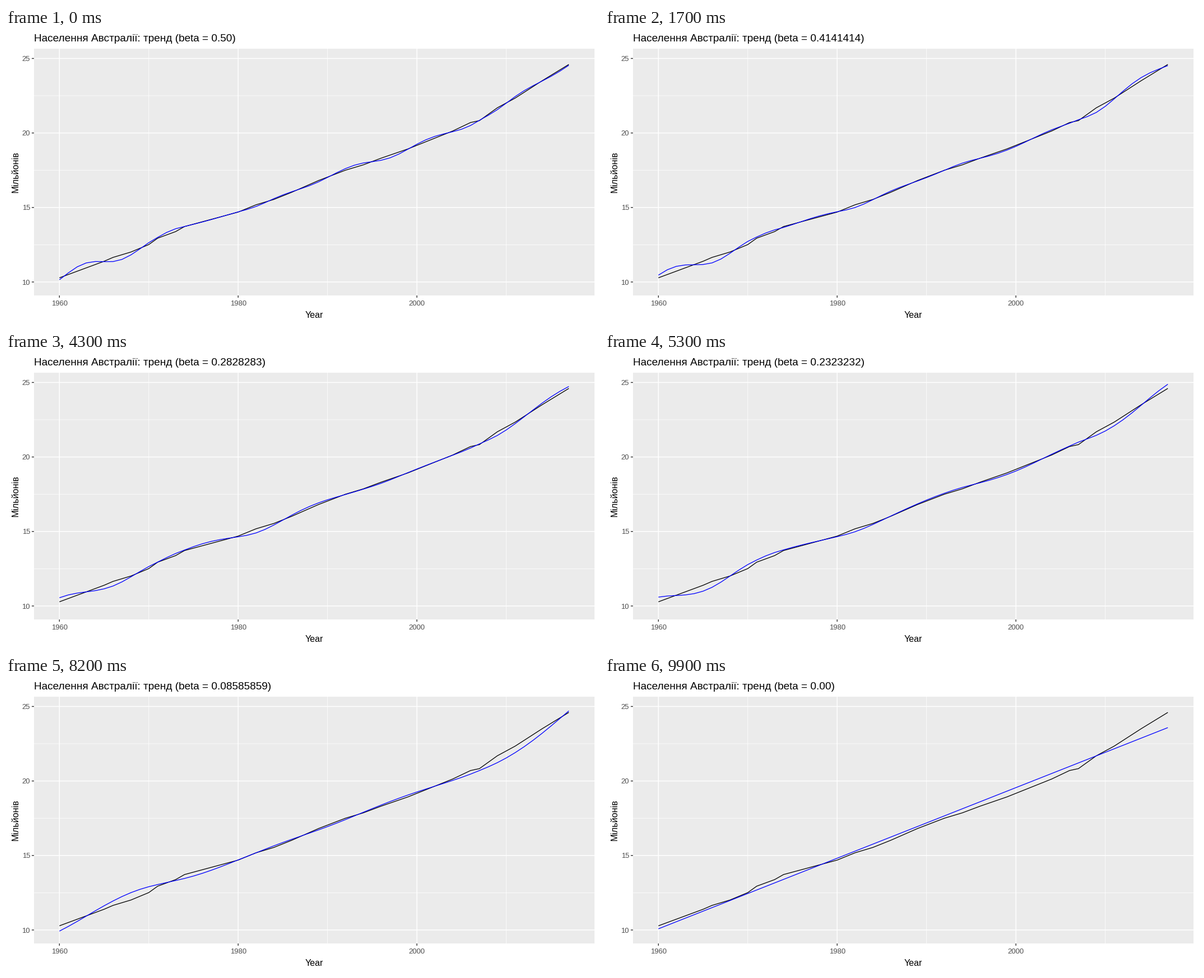
A matplotlib script for the animation above (10 s loop, 1058 by 529 pixels).

```python
import numpy as np
import matplotlib.pyplot as plt
from matplotlib.animation import FuncAnimation
from matplotlib.patches import Rectangle

W, H, DPI = 1058, 529, 100
FRAMES, INTERVAL = 100, 100
LEFT, RIGHT, TOP, BOTTOM = 50, 1050, 37, 478

plt.rcParams["font.family"] = "Liberation Sans"

# years where population growth changes pace, with millions of people
TURNS = {1960: 10.28, 1965: 11.39, 1966: 11.65, 1968: 12.01, 1970: 12.51,
         1971: 12.94, 1973: 13.38, 1974: 13.72, 1980: 14.69, 1982: 15.18,
         1984: 15.54, 1986: 16.02, 1989: 16.81, 1992: 17.50, 1994: 17.86,
         1996: 18.31, 1999: 18.93, 2004: 20.13, 2006: 20.70, 2007: 20.83,
         2009: 21.69, 2011: 22.34, 2014: 23.50, 2017: 24.60}
YEARS = np.arange(1960, 2018)
POP = np.interp(YEARS, list(TURNS), list(TURNS.values()))


def px(points):
    return points * 72 / DPI


def x_pos(year):
    return 95.3 + (year - 1960) * 15.945


def y_pos(value):
    return 453.9 - (value - 10) * 26.63


def smooth(series, level, slope, beta):
    """Linear trend whose slope is corrected by beta times each error."""
    fit = np.empty(len(series))
    for i, value in enumerate(series):
        fit[i] = level
        slope += beta * (value - level)
        level += slope
    return fit


def trend(beta):
    """Smoothed series with least-squares starting level and slope."""
    zeros = np.zeros(len(POP))
    base = smooth(POP, 0, 0, beta)
    basis = np.column_stack([smooth(zeros, 1, 0, beta), smooth(zeros, 0, 1, beta)])
    start = np.linalg.lstsq(basis, POP - base, rcond=None)[0]
    return base + basis @ start


def heading(beta, exact):
    number = f"{beta:.2f}" if exact else f"{beta:.7g}"
    return f"Населення Австралії: тренд (beta = {number})"


fig = plt.figure(figsize=(W / 100, H / 100), dpi=DPI, facecolor="white")
ax = fig.add_axes([0, 0, 1, 1])
ax.set_xlim(0, W)
ax.set_ylim(H, 0)
ax.axis("off")


def line(xs, ys, color, width, z):
    return ax.plot(xs, ys, color=color, lw=px(width), zorder=z, snap=False,
                   solid_capstyle="butt", solid_joinstyle="round")[0]


def label(x, y, text, size, color="black", ha="center", **kw):
    return ax.text(x, y, text, fontsize=px(size), color=color, ha=ha,
                   va="baseline", **kw)


ax.add_patch(Rectangle((LEFT, TOP), RIGHT - LEFT, BOTTOM - TOP,
                       facecolor="#EBEBEB", lw=0, zorder=0))

for year in range(1960, 2011, 10):
    x = x_pos(year)
    major = year % 20 == 0
    line([x, x], [TOP, BOTTOM], "white", 1.5 if major else 0.75, 1 + major)
    if major:
        line([x, x], [BOTTOM, BOTTOM + 4], "#333333", 1.4, 2)
        label(x, 496.5, str(year), 13, "#4D4D4D")

for value in np.arange(10, 26, 2.5):
    y = y_pos(value)
    major = value % 5 == 0
    line([LEFT, RIGHT], [y, y], "white", 1.5 if major else 0.75, 1 + major)
    if major:
        line([LEFT - 4, LEFT], [y, y], "#333333", 1.4, 2)
        label(43, y + 4.7, f"{value:.0f}", 13, "#4D4D4D", ha="right")

label(550, 518, "Year", 16)
label(21.5, 257.5, "Мільйонів", 16, rotation=90, rotation_mode="anchor")
title = label(50, 24, "", 19, ha="left")

line(x_pos(YEARS), y_pos(POP), "black", 1.3, 3)
curve = line(x_pos(YEARS), y_pos(POP), "blue", 1.3, 4)


def update(i):
    beta = 0.5 * (1 - i / (FRAMES - 1))
    curve.set_ydata(y_pos(trend(beta)))
    title.set_text(heading(beta, i in (0, FRAMES - 1)))
    return curve, title


anim = FuncAnimation(fig, update, frames=FRAMES, interval=INTERVAL,
                     repeat=True, repeat_delay=0)
plt.show()
```
